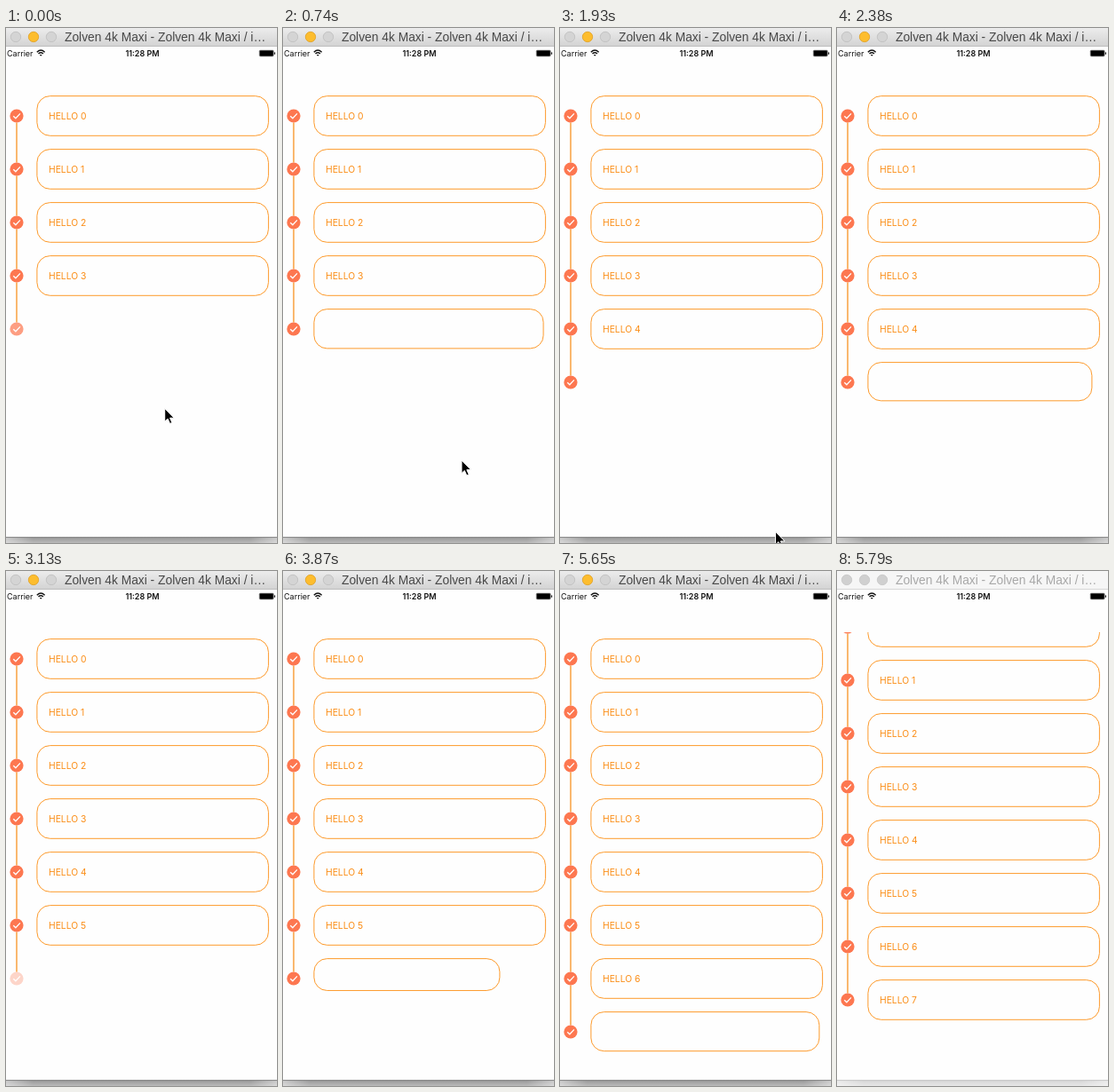
An HTML page that plays this animation: 305x580 px, repeating every 5910 ms.

```html
<!DOCTYPE html>
<html lang="en">
<head>
<meta charset="utf-8">
<title>Timeline list</title>
<style>
  html, body { margin: 0; width: 100%; height: 100%; overflow: hidden; background: #fefefe; }
  svg { display: block; width: 305px; height: 580px; }
  text { font-family: Inter, Roboto, sans-serif; }
  .title { font: 13.8px "Liberation Sans", Arial, sans-serif; }
  .status { font-size: 9px; fill: #111; }
  .label { font-size: 10.3px; fill: #fb8c14; }
  .box { fill: none; stroke: #fd9a2b; stroke-width: 1; }
  .link { stroke: #f9a03f; stroke-width: 1.5; }
  .dot { fill: #fd7750; }
  .check { fill: none; stroke: #fff; stroke-width: 1.3; }
</style>
</head>
<body>
<svg viewBox="0 0 305 580">
  <defs>
    <linearGradient id="bar" x2="0" y2="1">
      <stop offset="0" stop-color="#ececec"/><stop offset="1" stop-color="#d3d3d3"/>
    </linearGradient>
    <linearGradient id="shade" x2="0" y2="1">
      <stop offset="0" stop-color="#858585"/><stop offset=".3" stop-color="#a0a0a0"/>
      <stop offset="1" stop-color="#bababa"/>
    </linearGradient>
    <linearGradient id="pale" x2="0" y2="1">
      <stop offset="0" stop-color="#c6c6c6"/><stop offset=".3" stop-color="#dadada"/>
      <stop offset="1" stop-color="#e6e6e6"/>
    </linearGradient>
    <linearGradient id="corners">
      <stop offset="0" stop-color="#fff" stop-opacity=".45"/>
      <stop offset=".1" stop-color="#fff" stop-opacity="0"/>
      <stop offset=".9" stop-color="#fff" stop-opacity="0"/>
      <stop offset="1" stop-color="#fff" stop-opacity=".45"/>
    </linearGradient>
    <clipPath id="view"><rect y="69" width="305" height="504"/></clipPath>
  </defs>

  <rect width="305" height="580" fill="#fefefe"/>
  <rect id="edge" y="573" width="305" height="7"/>
  <rect y="574" width="305" height="6" fill="url(#corners)"/>

  <rect id="head" width="305" height="20.5"/>
  <line id="rule" y1="20.5" y2="20.5" x2="305"/>
  <g id="lights" stroke-width=".8">
    <circle cx="11" cy="10" r="5.7"/><circle cx="31" cy="10" r="5.7"/><circle cx="51" cy="10" r="5.7"/>
  </g>
  <text id="title" class="title" x="66" y="15">Zolven 4k Maxi - Zolven 4k Maxi / i…</text>

  <text class="status" x="1" y="32">Carrier</text>
  <g fill="none" stroke="#111" stroke-width="1.4">
    <path d="M34.8 27.2Q39.2 23 43.6 27.2M36.5 29.1Q39.2 26.6 41.9 29.1"/>
    <path d="M37.8 30.1h2.8l-1.4 1.7z" fill="#111" stroke="none"/>
  </g>
  <text class="status" x="153.5" y="32" text-anchor="middle" font-weight="600">11:28 PM</text>
  <rect x="284.8" y="24.8" width="16.7" height="7.4" rx="1.4" fill="#777"/>
  <rect x="285.7" y="25.6" width="14.9" height="5.8" rx=".8"/>
  <rect x="301.8" y="27.2" width="1.1" height="2.6" rx=".5"/>

  <g clip-path="url(#view)"><g id="list"></g></g>

  <path id="cursor" d="M0 0V14.6L3.3 11.5L5.8 17L8.2 16L5.8 10.7H10.5Z" fill="#000" stroke="#fff" stroke-width="1"/>
</svg>
<script>
const LOOP = 5910, SCROLL_AT = 5780, SCROLL = 36;
const ROWS = 8, STEP = 60, FIRST_Y = 99;
const BOX_START = [-9000, -9000, -9000, -9000, 275, 1945, 3525, 5193];
const FADE_LEAD = 580, PART = 490, BOX_TIME = 500;
const $ = id => document.getElementById(id);

function make(tag, parent, attrs = {}) {
  const el = document.createElementNS("http://www.w3.org/2000/svg", tag);
  parent.append(el);
  return set(el, attrs);
}

function set(el, attrs) {
  for (const key in attrs) el.setAttribute(key, attrs[key]);
  return el;
}

// cubic-bezier(.42, 0, .58, 1)
function ease(x) {
  if (x <= 0) return 0;
  if (x >= 1) return 1;
  let lo = 0, hi = 1, s = 0.5;
  for (let i = 0; i < 18; i++) {
    s = (lo + hi) / 2;
    const r = 1 - s;
    if (1.26 * s * r * r + 1.74 * s * s * r + s * s * s < x) lo = s; else hi = s;
  }
  return s * s * (3 - 2 * s);
}

const tween = (t, start, time) => ease((t - start) / time);
const show = (el, on) => el.setAttribute("visibility", on ? "visible" : "hidden");

const rows = Array.from({ length: ROWS }, (_, i) => {
  const g = make("g", $("list"), { transform: `translate(0 ${FIRST_Y + i * STEP})` });
  const link = make("line", g, { class: "link", x1: 12, x2: 12, y1: 7.5 });
  const dot = make("g", g);
  make("circle", dot, { class: "dot", cx: 12, r: 7.6 });
  make("path", dot, { class: "check", d: "M8.3 .2L10.9 2.8L15.9 -2.6" });
  const box = make("rect", g, { class: "box", x: 34.9, y: -22.4 });
  const label = make("text", g, { class: "label", x: 48, y: 4 });
  label.textContent = "HELLO " + i;
  return { start: BOX_START[i], last: i === ROWS - 1, link, dot, box, label };
});

function drawRow(row, t) {
  const { start } = row;
  set(row.dot, { opacity: tween(t, start - FADE_LEAD, PART) });

  const size = tween(t, start, BOX_TIME), h = 44.7 * size;
  set(row.box, { width: 260.5 * size, height: h, rx: Math.min(14.7, h / 2) });
  show(row.box, size > 0.002);
  show(row.label, t >= start + BOX_TIME);

  const grow = row.last ? 0 : tween(t, start + PART, PART);
  set(row.link, { y2: 7.5 + 45 * grow });
  show(row.link, grow > 0);
}

function drawWindow(active) {
  set($("head"), { fill: active ? "url(#bar)" : "#f6f6f6" });
  set($("rule"), { stroke: active ? "#bdbdbd" : "#d6d6d6" });
  set($("title"), { fill: active ? "#484848" : "#a8a8a8" });
  set($("edge"), { fill: active ? "url(#shade)" : "url(#pale)" });
  [...$("lights").children].forEach((c, i) => {
    const lit = active && i === 1;
    set(c, {
      fill: lit ? "#fdbd2e" : active ? "#d4d4d4" : "#d0d0d0",
      stroke: lit ? "#e0a023" : active ? "#bebebe" : "#c6c6c6"
    });
  });
}

function drawCursor(t) {
  const a = tween(t, 150, 800), b = tween(t, 1400, 750);
  set($("cursor"), { transform: `translate(${178.7 + 26 * a + 46 * b} ${428.5 + 68 * a + 86 * b})` });
  show($("cursor"), b < 1);
}

function draw(t) {
  const scrolled = t >= SCROLL_AT;
  drawWindow(!scrolled);
  set($("list"), { transform: `translate(0 ${scrolled ? -SCROLL : 0})` });
  rows.forEach(row => drawRow(row, t));
  drawCursor(t);
}

const began = performance.now();
function tick(now) {
  draw(Math.max(0, now - began) % LOOP);
  requestAnimationFrame(tick);
}
draw(0);
requestAnimationFrame(tick);
</script>
</body>
</html>
```
